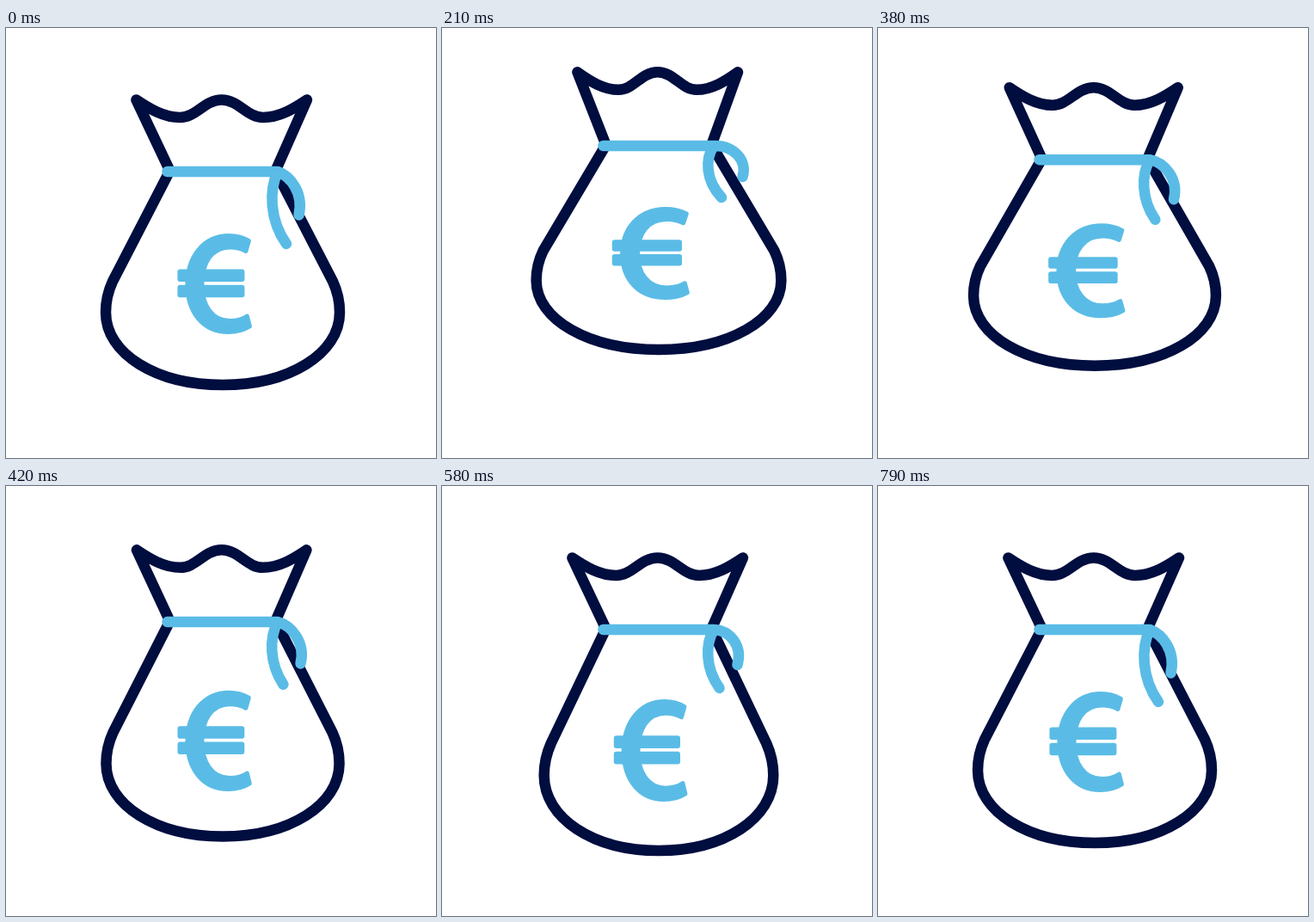
These frames come from a looping animation (500x500 px, 830 ms). An HTML page:

```html
<!DOCTYPE html>
<html lang="en">
<head>
<meta charset="utf-8">
<title>Money bag</title>
<style>
  html, body { margin: 0; width: 100%; height: 100%; overflow: hidden; background: #fff; }
  svg { display: block; width: 100%; height: 100%; }
  .line { fill: none; stroke-width: 12.5; stroke-linecap: round; stroke-linejoin: round; }
  .navy { stroke: #000d3f; }
  .sky { stroke: #5abce6; }
  #euro { fill: #5abce6; }
  #euro path { stroke: #5abce6; stroke-width: 5; stroke-linejoin: round; }
</style>
</head>
<body>
<svg viewBox="0 0 500 500">
  <path id="bag" class="line navy"/>
  <path id="mouth" class="line navy"/>
  <g id="euro">
    <path d="M283 247.500C276 243.500 268 241.500 260 241.500C230 241.500 211.500 266 211.500 298C211.500 331 230 353.500 259 353.500C268 353.500 277 351.500 284 347L281 335C276 338.500 269 340.500 261 340.500C240 340.500 228.500 322 228.500 298C228.500 273 240 255 261 255C268 255 274 256.500 279.500 259.500Z"/>
    <rect x="200" y="280.500" width="78" height="14.500" rx="3"/>
    <rect x="200" y="298.700" width="78" height="14.500" rx="3"/>
  </g>
  <path id="tie" class="line sky"/>
</svg>
<script>
const LOOP = 830, STEP = 125 / 3;
const $ = id => document.getElementById(id);

// Every move starts and ends at rest (0) and passes its values on the beats.
const beats = [0, 2, 5, 9, 12, 14, 18];
const moves = {
  hop:     [0.77, 1, 0.46, 0, 0],
  stretch: [16, -11, -8.5, 24.5, 9],
  sink:    [13, -5.5, -1.5, 28, 10],
  tuck:    [0.5, 1, 0.6, 0.29, 0.67],
  lift:    [0.17, 1, 0.31, 0, 0.66]
};

// Smooth spline through the beats.
function at(move, k) {
  const v = [0, ...move, 0];
  const i = beats.findIndex(b => b > k) - 1;
  if (i < 0) return 0;
  const slope = j => j > 0 && j < v.length - 1
    ? (v[j + 1] - v[j - 1]) / (beats[j + 1] - beats[j - 1]) : 0;
  const d = beats[i + 1] - beats[i], u = (k - beats[i]) / d, w = 1 - u;
  return v[i] * w * w * (1 + 2 * u) + v[i + 1] * u * u * (3 - 2 * u)
    + d * u * w * (slope(i) * w - slope(i + 1) * u);
}

// Straight shoulders running into a rounded belly.
function bagPath(y, stretch) {
  const height = 248 + stretch;
  const half = 136 - stretch * (stretch < 0 ? 0.58 : 0.3);
  const cx = 252, bend = y + height * 0.515, wide = y + height * 0.66, low = y + height;
  const gap = wide - bend, drop = wide + (low - wide) * 0.57;
  const l = n => cx - half + n, r = n => cx + half - n, round = half * 0.43;
  return `M190 ${y}L${l(8)} ${bend}
    C${l(3)} ${bend + gap * 0.3} ${l(0)} ${wide - gap * 0.35} ${l(0)} ${wide}
    C${l(0)} ${drop} ${l(round)} ${low} ${cx} ${low}
    C${r(round)} ${low} ${r(0)} ${drop} ${r(0)} ${wide}
    C${r(0)} ${wide - gap * 0.35} ${r(3)} ${bend + gap * 0.3} ${r(8)} ${bend}
    L314 ${y}`;
}

// Wavy opening above the tie, narrower at the top of the hop.
function mouthPath(y, hop) {
  const pinch = hop * hop, top = y - 83.5 - 2.2 * pinch, dip = top + 20.5;
  const x = n => 250.7 + n * (99.3 - 6 * pinch);
  return `M191 ${y}L${x(-1)} ${top}
    C${x(-0.85)} ${top + 10} ${x(-0.68)} ${dip} ${x(-0.485)} ${dip}
    C${x(-0.3)} ${dip} ${x(-0.2)} ${top} ${x(0)} ${top}
    C${x(0.2)} ${top} ${x(0.3)} ${dip} ${x(0.485)} ${dip}
    C${x(0.68)} ${dip} ${x(0.85)} ${top + 10} ${x(1)} ${top}
    L313 ${y}`;
}

function tiePath(y, hop, tuck, lift) {
  const lx = 326 - 3.2 * Math.sin(Math.PI * tuck) - tuck, ly = 84 - 24 * tuck;
  const rx = 340.5 + 4.5 * (hop + lift), ry = 50.5 - 14.5 * lift;
  return `M187.500 ${y}H316
    C306 ${y + ly * 0.25} 306 ${y + ly * 0.66} ${lx} ${y + ly}
    M316 ${y}C${330 + 9 * lift} ${y + 5 - 6 * lift} ${rx + 6} ${y + ry * 0.48} ${rx} ${y + ry}`;
}

function draw(k) {
  const p = {};
  for (const name in moves) p[name] = at(moves[name], k);
  const hop = Math.max(0, p.hop), y = 167 - 30 * hop;
  $("bag").setAttribute("d", bagPath(y, p.stretch));
  $("mouth").setAttribute("d", mouthPath(y, hop));
  $("tie").setAttribute("d", tiePath(y, hop, p.tuck, p.lift));

  const grow = p.stretch * (p.stretch < 0 ? 0.007 : 0.002);
  $("euro").setAttribute("transform",
    `translate(238.4 ${y + 130.5 + p.sink}) scale(${1 - grow * 0.55} ${1 + grow}) translate(-239 -297.5)`);
}

// Poses hold for 1/24 s, rounded to 10 ms.
function tick() {
  const t = Math.floor(performance.now() % LOOP / 10) * 10;
  draw(Math.floor((t + 4.9) / STEP));
  requestAnimationFrame(tick);
}
tick();
</script>
</body>
</html>
```
